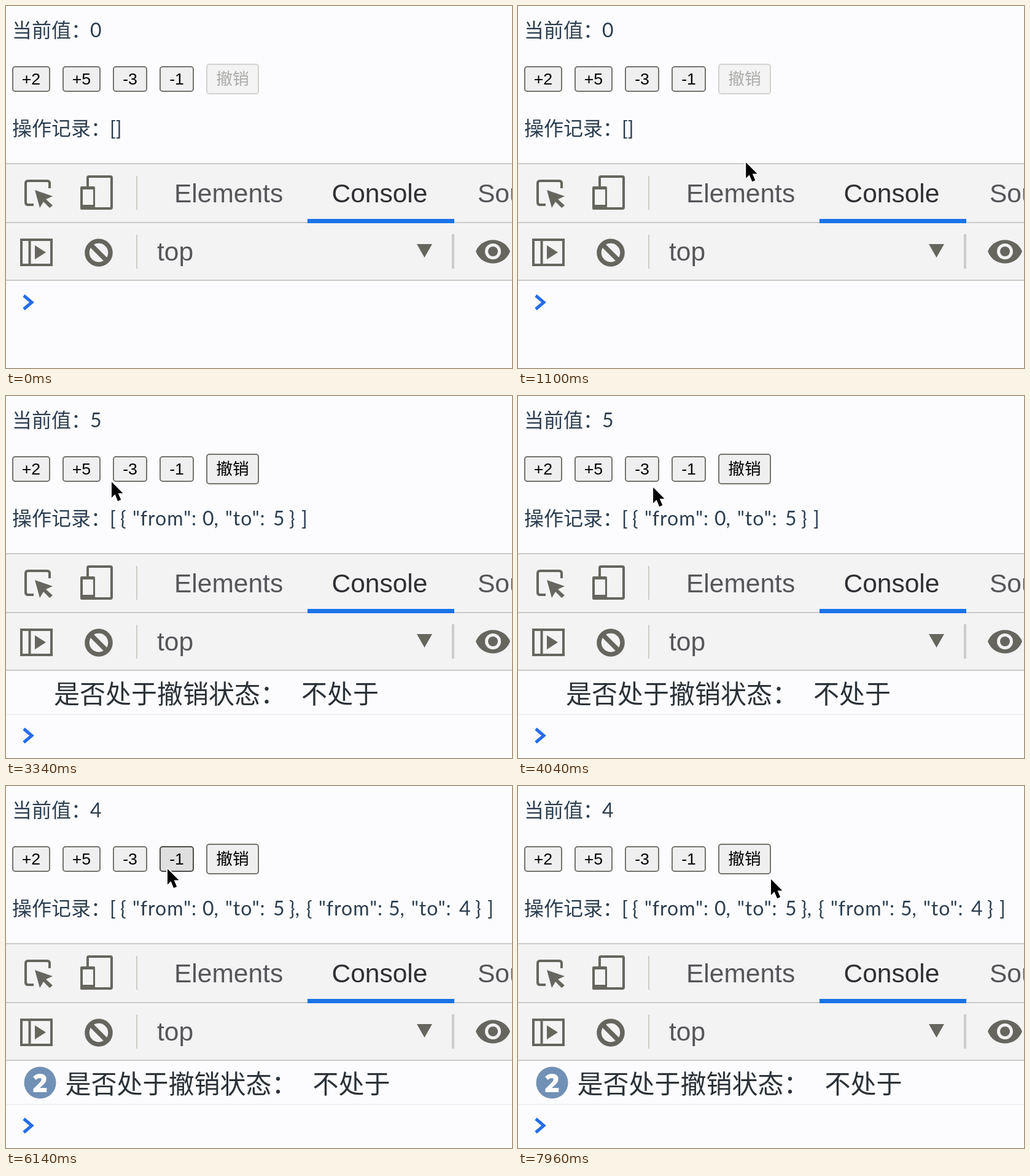
An HTML page that plays this animation: 824 by 590 pixels, repeating every 8000 ms.

```html
<!DOCTYPE html>
<html lang="zh-CN">
<head>
<meta charset="utf-8">
<title>Undo demo</title>
<style>
  html, body { margin: 0; width: 100%; height: 100%; overflow: hidden; background: #fcfcfe; }
  svg { display: block; width: 824px; height: 590px; }
  text { white-space: pre; }
  .page { font: 32px Lato, "Noto Sans CJK SC", "Noto Sans CJK", sans-serif; fill: #2c3e50; }
  .page.cjk, .log { font-family: "Noto Sans CJK SC", "Noto Sans CJK", sans-serif; }
  .word { letter-spacing: 1px; }
  .button rect { fill: #efeff0; stroke: #74746e; stroke-width: 2; }
  .button text { font: 26.67px "Liberation Sans", "Noto Sans CJK SC", "Noto Sans CJK", Arial, sans-serif; text-anchor: middle; }
  .button.hover rect { fill: #dfdfe0; stroke: #4c4c48; }
  .button.active rect { fill: #f5f5f6; stroke: #8d8d88; }
  .button.disabled rect { fill: #f3f3f4; stroke: #d2d2d0; }
  .button.disabled text { fill: #aaaaa8; }
  .bar { font: 42.5px "Liberation Sans", Arial, sans-serif; fill: #56565a; }
  .log { font-size: 42px; fill: #2b3138; }
  .icon { fill: #66665f; }
  .outline { fill: none; stroke: #66665f; stroke-width: 4; }
  .rule { stroke: #cbcbc8; stroke-width: 2; }
</style>
</head>
<body>
<svg viewBox="0 0 824 590">
  <rect width="824" height="590" fill="#fcfcfe"/>
  <text class="page cjk" x="10" y="51">当前值：</text>
  <text class="page" id="value" x="137" y="51"></text>
  <g id="buttons"></g>
  <text class="page cjk" x="10" y="211">操作记录：</text>
  <g id="records" class="page"></g>

  <rect y="257" width="824" height="190" fill="#f3f3f4"/>
  <rect id="tabHover" x="236" y="260" width="256" height="90" fill="#eaeaeb"/>
  <path class="rule" d="M0 257H824M0 353H824M0 447H824M213 277V332M213 373V428"/>
  <path d="M728 372V428" stroke="#cbcbc8" stroke-width="4"/>
  <rect x="491" y="347" width="239" height="7" fill="#1a73e8"/>
  <g class="bar">
    <text id="tab" x="274" y="320">Elements</text>
    <text x="530.500" y="320" fill="#303034">Console</text>
    <text x="768" y="320">Sources</text>
    <text x="246" y="415">top</text>
  </g>

  <path class="outline" d="M45 324H36Q32 324 32 320V289Q32 285 36 285H67Q71 285 71 289V297"/>
  <path class="icon" d="M47 300L76 310L65 315L76 325L71 329L61 319L55 329Z"/>
  <path class="outline" d="M133 294V280Q133 278 135 278H170Q172 278 172 280V328Q172 330 170 330H143"/>
  <path class="icon" fill-rule="evenodd" d="M123 294H143Q145 294 145 296V330Q145 332 143 332H123Q121 332 121 330V296Q121 294 123 294ZM125 299V324H142V299Z"/>
  <path class="outline" d="M25 381H74V422H25ZM38.500 381V422"/>
  <path class="icon" d="M47 390L65 401.500L47 413ZM669 388H694L681.500 410Z"/>
  <g class="outline" style="stroke-width:7.500">
    <circle cx="151" cy="402" r="19"/>
    <path d="M138 389L164 415"/>
  </g>
  <path class="icon" d="M765 400C775 375 811 375 821 400C811 426 775 426 765 400Z"/>
  <circle cx="793" cy="400" r="13" fill="#f3f3f4"/>
  <circle class="icon" cx="793" cy="400" r="8"/>

  <g id="log">
    <g id="badge">
      <circle cx="55.500" cy="483.500" r="26" fill="#7190b5"/>
      <text x="55.500" y="499" fill="#fff" text-anchor="middle" style="font:800 42px 'Open Sans',sans-serif">2</text>
    </g>
    <g id="message" class="log">
      <text x="78" y="501">是否处于撤销状态：</text>
      <text x="481" y="501">不处于</text>
    </g>
    <path d="M0 519H824" stroke="#f0f0f0" stroke-width="2"/>
  </g>
  <path id="prompt" d="M29 472L42 483L29 494" fill="none" stroke="#256cea" stroke-width="5"/>

  <g id="cursor" stroke-linejoin="round">
    <path id="arrow" transform="scale(.92)" d="M0 0V28L6 22L11 34L16.500 31.500L11.500 20H20Z" stroke="#fff" stroke-width="4" paint-order="stroke"/>
    <g id="hand" fill="#fff" stroke="#000" stroke-width="2">
      <path d="M1 4q-1-4 3-4q2 0 3 3l3 9q4-2 5 1q4-2 5 1q4-1 4 2l1 6q0 4-2 6v4h-13v-3l-8-9q-2-4 3-3l3 2z"/>
      <path d="M13 19l1 7M17 19l1 6M21 19l0 6" stroke-width="1.500"/>
    </g>
  </g>
</svg>
<script>
const DURATION = 8000, ENTER = 60, FIRST_CLICK = 2300, SECOND_CLICK = 5450, PRESS = 120;
const $ = id => document.getElementById(id);

function add(parent, name, attributes, text = '') {
  const node = document.createElementNS('http://www.w3.org/2000/svg', name);
  for (const key in attributes) node.setAttribute(key, attributes[key]);
  node.textContent = text;
  return parent.appendChild(node);
}

function makeButton(label, x, width, y = 98, height = 42) {
  const node = add($('buttons'), 'g', { class: 'button' });
  add(node, 'rect', { x: x + 1, y: y + 1, width: width - 2, height: height - 2, rx: 4 });
  add(node, 'text', { x: x + width / 2, y: 128 }, label);
  return { node, contains: (px, py) => px >= x && px < x + width && py >= y && py < y + height };
}

const buttons = [
  makeButton('+2', 10, 62), makeButton('+5', 92, 62),
  makeButton('-3', 174, 56), makeButton('-1', 250, 56),
  makeButton('撤销', 326, 86, 94, 50)
];
const undo = buttons[4];

// Each state lists the words of the printed array with their left edges.
function makeRecords(pairs) {
  const group = add($('records'), 'g', {});
  const put = (text, x) => add(group, 'text', { x, y: 211, class: text.length > 3 ? 'word' : '' }, text);
  if (!pairs.length) put('[]', 169);
  else {
    put('[', 169);
    pairs.forEach(([from, to], i) => {
      const x = 186 + 303 * i, last = i === pairs.length - 1;
      put('{', x);
      put('"from":', x + 20);
      put(from + ',', x + 134);
      put('"to":', x + 171);
      put(String(to), x + 249);
      put(last ? '}' : '},', x + 275);
      if (last) put(']', x + 295);
    });
  }
  return group;
}

const values = [0, 5, 4];
const records = [[], [[0, 5]], [[0, 5], [5, 4]]].map(makeRecords);

// Cursor path: time, x, y
const path = [
  [60, 590, 510], [500, 443, 297], [820, 405, 270], [920, 405, 270],
  [1660, 180, 170], [1760, 180, 170], [2080, 116, 116], [2500, 116, 116],
  [2600, 116, 116], [3340, 172, 140], [3440, 172, 140], [4180, 225, 150],
  [4280, 225, 150], [4740, 239, 125], [5020, 262, 125], [5640, 262, 125],
  [6140, 263, 135], [6700, 305, 164], [6800, 305, 164], [7540, 400, 163],
  [7640, 400, 163], [7960, 412, 152]
];

function cursorAt(t) {
  const next = path.findIndex(point => point[0] > t);
  if (next < 0) return path[path.length - 1].slice(1);
  if (!next) return path[0].slice(1);
  const [t0, x0, y0] = path[next - 1], [t1, x1, y1] = path[next];
  const u = (t - t0) / (t1 - t0), ease = u * u * (3 - 2 * u);
  return [x0 + (x1 - x0) * ease, y0 + (y1 - y0) * ease];
}

function show(node, visible) {
  node.style.display = visible ? '' : 'none';
}

function render(t) {
  const [x, y] = cursorAt(t), entered = t >= ENTER;
  const state = t < FIRST_CLICK ? 0 : t < SECOND_CLICK ? 1 : 2;
  const pressed = [FIRST_CLICK, SECOND_CLICK].some(click => t >= click - PRESS && t < click);
  const onTabs = entered && y >= 260 && y < 350;
  const onElements = onTabs && x >= 236 && x < 492;

  $('value').textContent = values[state];
  records.forEach((group, i) => show(group, i === state));
  for (const button of buttons) {
    const over = entered && button.contains(x, y);
    const look = button === undo && !state ? 'disabled' : over ? (pressed ? 'active' : 'hover') : '';
    button.node.setAttribute('class', 'button ' + look);
  }

  show($('tabHover'), onElements);
  $('tab').style.fill = onElements ? '#303034' : '';
  show($('log'), state > 0);
  show($('badge'), state === 2);
  $('message').setAttribute('transform', `translate(${state === 2 ? 18.5 : 0})`);
  $('prompt').setAttribute('transform', `translate(0 ${state ? 70.5 : 0})`);

  show($('cursor'), entered);
  show($('hand'), onTabs);
  show($('arrow'), !onTabs);
  $('cursor').setAttribute('transform', `translate(${x} ${y})`);
}

function tick() {
  render(performance.now() % DURATION);
  requestAnimationFrame(tick);
}
tick();
</script>
</body>
</html>
```
